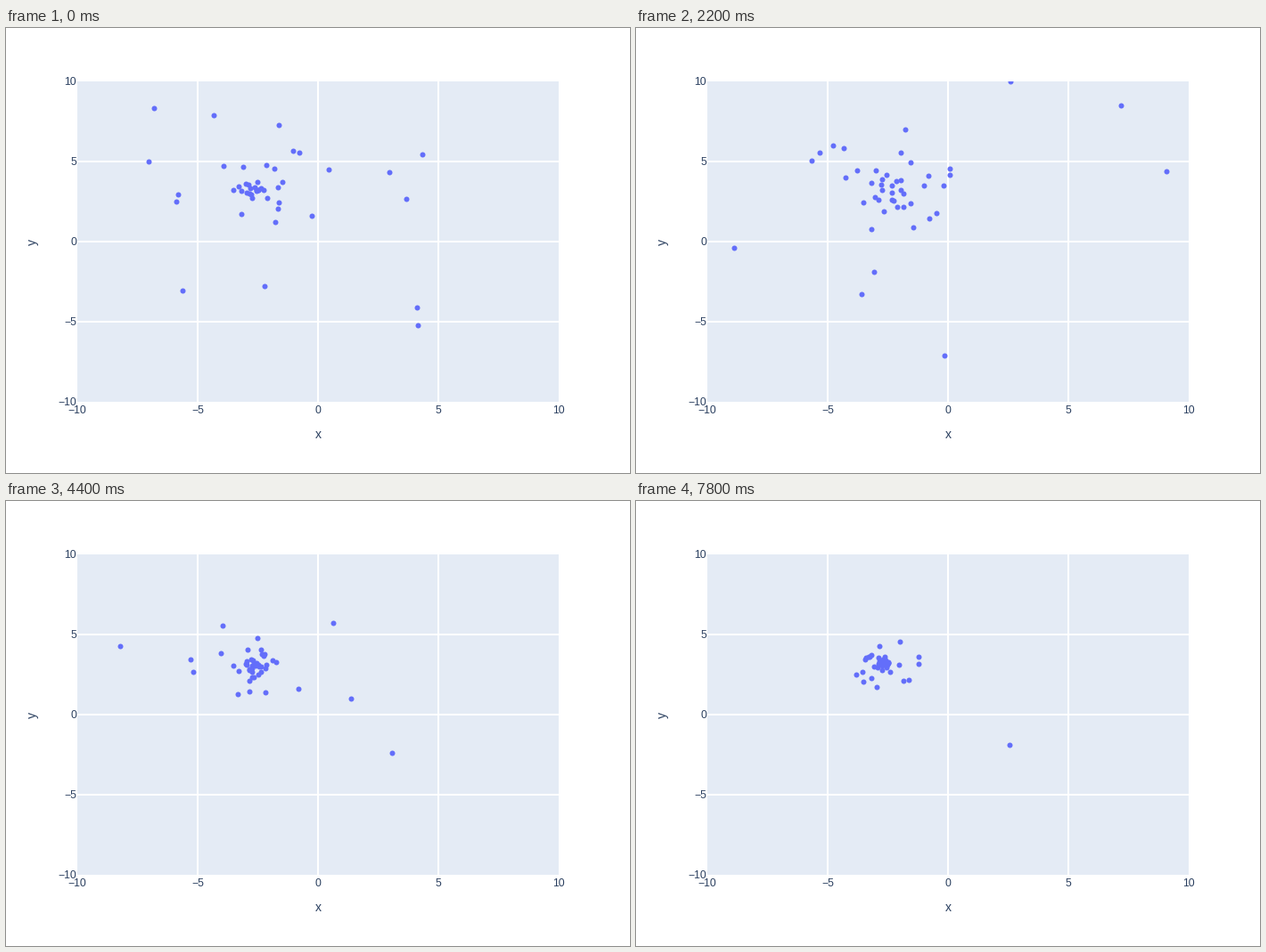
A matplotlib script that plays this animation: 700x500 px, repeating every 8000 ms.

```python
import numpy as np
import matplotlib.pyplot as plt
from matplotlib.animation import FuncAnimation
from matplotlib.patches import Rectangle

W, H, DPI = 700, 500, 100
FRAMES, STEP_MS = 40, 200
COUNT = 46
PT = 72 / DPI  # points per pixel
INK, PANEL, DOT = "#2a3f5f", "#e4ebf5", "#636efa"
LEFT, TOP, RIGHT, BOTTOM = 80, 60, 620, 420
CENTRE = np.array([276, 183])

rng = np.random.default_rng(11)

# Each pose: step, tight and wide spread of the swarm, stragglers (pixels).
POSES = [
    (0, 8, 48, [
        (166, 90), (233, 98), (306, 109), (160, 150), (362, 159), (430, 162),
        (467, 142), (449, 192), (198, 295), (290, 290), (461, 314),
        (462, 334)]),
    (7, 16, 36, [
        (118, 132), (159, 88), (172, 102), (277, 87), (330, 80), (355, 110),
        (433, 129), (402, 148), (420, 186), (256, 267)]),
    (15, 10, 34, [(397, 151), (163, 311), (279, 370), (354, 241)]),
    (22, 8, 28, [(128, 163), (367, 137), (387, 222), (433, 283)]),
    (28, 4, 24, [(358, 137), (474, 309), (270, 364)]),
    (32, 5, 22, [(205, 220), (355, 163), (350, 197)]),
    (39, 4, 20, [(419, 274)]),
]
STEPS = [p[0] for p in POSES]

# Area (x0, y0, x1, y1) the dots reach between one pose and the next.
AREAS = [
    (76, 56, 577, 424),
    (110, 60, 595, 368),
    (131, 72, 510, 404),
    (88, 81, 433, 364),
    (113, 81, 475, 365),
    (126, 90, 375, 256),
]


def make_pose(tight, wide, far):
    n = COUNT - len(far)
    spread = np.where(np.arange(n) < n * 0.5, tight, wide)[:, None]
    core = CENTRE + rng.normal(size=(n, 2)) * spread * (1, 0.7)
    return rng.permutation(np.vstack([far, core]))


def make_swing(a, b, sway, area):
    """Peak offset and number of half waves for every dot."""
    amp = rng.normal(size=(COUNT, 2)) * sway
    amp *= rng.exponential(1, (COUNT, 1)) ** 1.3
    waves = rng.integers(1, 4, (COUNT, 1))
    lo, hi = np.array(area[:2]), np.array(area[2:])
    for side, i in enumerate(rng.choice(COUNT, 4, replace=False)):
        goal = lo + (hi - lo) * rng.uniform(0.25, 0.75, 2)
        goal[side % 2] = area[side]
        amp[i] = goal - (a[i] + b[i]) / 2
        waves[i] = 1
    return amp, waves, lo, hi


poses = [make_pose(*p[1:]) for p in POSES]
swings = [make_swing(poses[k], poses[k + 1], 42 * 0.7 ** k, area)
          for k, area in enumerate(AREAS)]


def swarm(step):
    if step in STEPS:
        return poses[STEPS.index(step)]
    k = np.searchsorted(STEPS, step) - 1
    u = (step - STEPS[k]) / (STEPS[k + 1] - STEPS[k])
    a, b = poses[k], poses[k + 1]
    amp, waves, lo, hi = swings[k]
    pos = a + (b - a) * u * u * (3 - 2 * u) + amp * np.sin(np.pi * waves * u)
    return np.clip(pos, lo, hi)


plt.rcParams["font.family"] = "Liberation Sans"
fig = plt.figure(figsize=(W / DPI, H / DPI), dpi=DPI, facecolor="white")
ax = fig.add_axes([0, 0, 1, 1])
ax.set_xlim(0, W)
ax.set_ylim(H, 0)
ax.axis("off")


def label(x, y, text, px, **kw):
    kw = {"ha": "center", "va": "baseline", **kw}
    ax.text(x, y, text, size=px * PT, color=INK, **kw)


panel = Rectangle((LEFT, TOP), RIGHT - LEFT, BOTTOM - TOP, fc=PANEL, lw=0)
ax.add_patch(panel)

for value in range(-10, 11, 5):
    x, y = 350 + 27 * value, 240 - 18 * value
    if abs(value) < 10:
        ax.plot([x, x], [TOP, BOTTOM], color="white", lw=2 * PT)
        ax.plot([LEFT, RIGHT], [y, y], color="white", lw=2 * PT)
    text = str(value).replace("-", "\u2212")
    label(x, 433.3, text, 12.3)
    label(79, y + 4.2, text, 12.3, ha="right")

label(350, 461, "x", 14)
label(30, 240, "y", 14, rotation=90, va="center")

dots = ax.scatter([], [], s=(6 * PT) ** 2, c=DOT, linewidths=0, zorder=3)
dots.set_clip_path(panel)


def draw(step):
    dots.set_offsets(swarm(step))
    return [dots]


anim = FuncAnimation(fig, draw, frames=FRAMES, interval=STEP_MS,
                     init_func=lambda: draw(0), repeat=True, repeat_delay=0)
plt.show()
```
